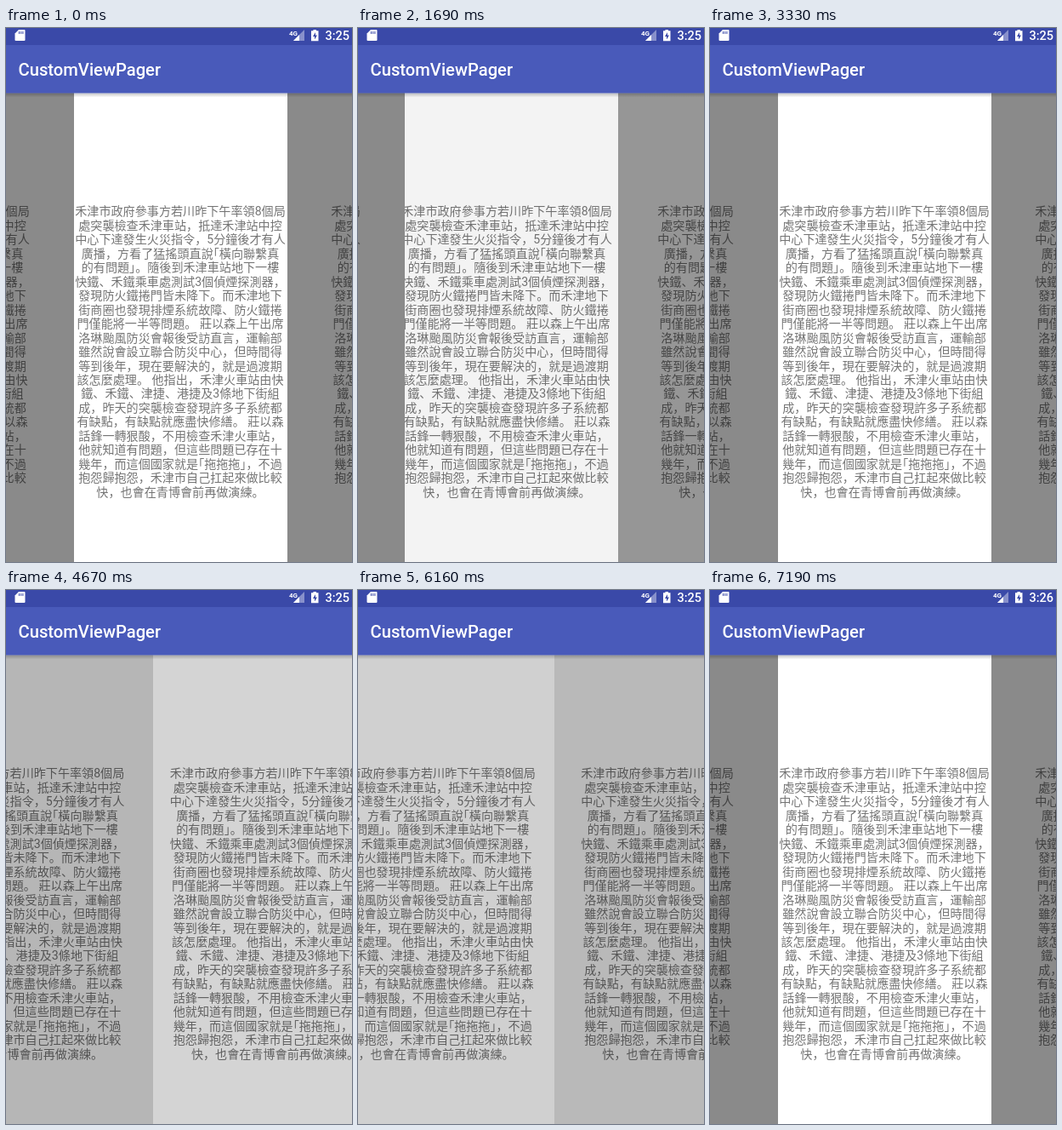
These frames come from a looping animation (407x627 px, 8000 ms). An HTML page:

```html
<!DOCTYPE html>
<html lang="zh-Hans">
<head>
<meta charset="utf-8">
<title>CustomViewPager</title>
<style>
  html, body { margin: 0; width: 100%; height: 100%; overflow: hidden; }
  body { position: relative; background: #8b8b8b; font-family: Roboto, "Noto Sans CJK SC", "Noto Sans CJK JP", "Noto Sans CJK", sans-serif; }
  .page { position: absolute; top: 76px; bottom: 0; width: 251px; overflow: hidden; }
  .page div {
    position: absolute; top: 131.4px; width: 251px;
    font-size: 14.1px; line-height: 16.47px; text-align: center;
    white-space: pre; text-spacing-trim: space-all;
  }
  svg { position: absolute; left: 0; top: 0; }
</style>
</head>
<body>
<svg width="407" height="84" fill="#fff" font-weight="500">
  <defs>
    <linearGradient id="shade" x2="0" y2="1">
      <stop stop-opacity=".22"/><stop offset="1" stop-opacity="0"/>
    </linearGradient>
  </defs>
  <rect y="76.500" width="407" height="5" fill="url(#shade)"/>
  <rect width="407" height="76.500" fill="#495aba"/>
  <rect width="407" height="20" fill="#3a49a8"/>
  <path d="M15 2h6.500q1 0 1 1v11q0 1-1 1h-10q-1 0-1-1V6.500z"/>
  <path d="M15.500 4v3M17.700 4v3M19.900 4v3" stroke="#3a49a8"/>
  <path d="M351 2v13h-13z" opacity=".4"/>
  <path d="M345 8v7h-7z"/>
  <text x="333" y="8.500" font-size="8" font-weight="700">4G</text>
  <path d="M361.500 2h3.500v1.300h2.500v12h-8.500v-12h2.500z"/>
  <path d="M364 5l-3 5h2v3.500l3-5h-2z" fill="#3a49a8"/>
  <text id="clock" x="404" y="14" font-size="14.500" text-anchor="end">3:25</text>
  <text x="14.500" y="56" font-size="20.200">CustomViewPager</text>
</svg>
<script>
const STORY = `禾津市政府參事方若川昨下午率領8個局
處突襲檢查禾津車站，抵達禾津站中控
中心下達發生火災指令，5分鐘後才有人
廣播，方看了猛搖頭直說｢橫向聯繫真
的有問題｣。隨後到禾津車站地下一樓
快鐵、禾鐵乘車處測試3個偵煙探測器，
發現防火鐵捲門皆未降下。而禾津地下
街商圈也發現排煙系統故障、防火鐵捲
門僅能將一半等問題。 莊以森上午出席
洛琳颱風防災會報後受訪直言，運輸部
雖然說會設立聯合防災中心，但時間得
等到後年，現在要解決的，就是過渡期
該怎麼處理。 他指出，禾津火車站由快
鐵、禾鐵、津捷、港捷及3條地下街組
成，昨天的突襲檢查發現許多子系統都
有缺點，有缺點就應盡快修繕。 莊以森
話鋒一轉狠酸，不用檢查禾津火車站，
他就知道有問題，但這些問題已存在十
幾年，而這個國家就是｢拖拖拖｣，不過
抱怨歸抱怨，禾津市自己扛起來做比較
快，也會在青博會前再做演練。`;

const LOOP = 8000, START = 493, TICK = 148.6, WIDTH = 251, LEFT = 80, PARALLAX = 50;
// [tick, scroll position in pages]
const KEYS = [[0, 0], [4, .462], [9, 1.1], [11, 1.3], [13, 1.3], [16, 1.1], [18, 1.1],
  [20, 1], [25, 1], [29, 1.629], [30, 1.629], [33, 1.95], [36, 1.95], [39, 1.4],
  [43, 1.03], [45, 1.03], [46, 1], [60, 1]];

const clock = document.getElementById('clock');
const pages = [-1, 0, 1, 2, 3].map(index => {
  const box = document.createElement('div'), text = document.createElement('div');
  box.className = 'page';
  text.textContent = STORY;
  box.append(text);
  document.body.prepend(box);
  return { index, box, text };
});

function scrollAt(tick) {
  const i = KEYS.findIndex(k => k[0] > tick);
  const [t0, p0] = KEYS[i - 1], [t1, p1] = KEYS[i];
  return p0 + (p1 - p0) * (tick - t0) / (t1 - t0);
}

const gray = v => `rgb(${v},${v},${v})`;

function draw(now) {
  const t = now % LOOP;
  const tick = t < START ? 0 : Math.floor((t - START) / TICK) + 1;
  const scroll = scrollAt(tick);
  for (const { index, box, text } of pages) {
    const pos = index - scroll;
    const near = Math.max(-1, Math.min(1, pos));
    const light = 1 - .457 * Math.abs(near);
    box.style.left = Math.round(LEFT + WIDTH * pos) + 'px';
    box.style.background = gray(255 * light);
    text.style.left = PARALLAX * near - .5 + 'px';
    text.style.color = gray(117 * light);
  }
  clock.textContent = tick < 41 ? '3:25' : '3:26';
  requestAnimationFrame(draw);
}
draw(performance.now());
</script>
</body>
</html>
```
